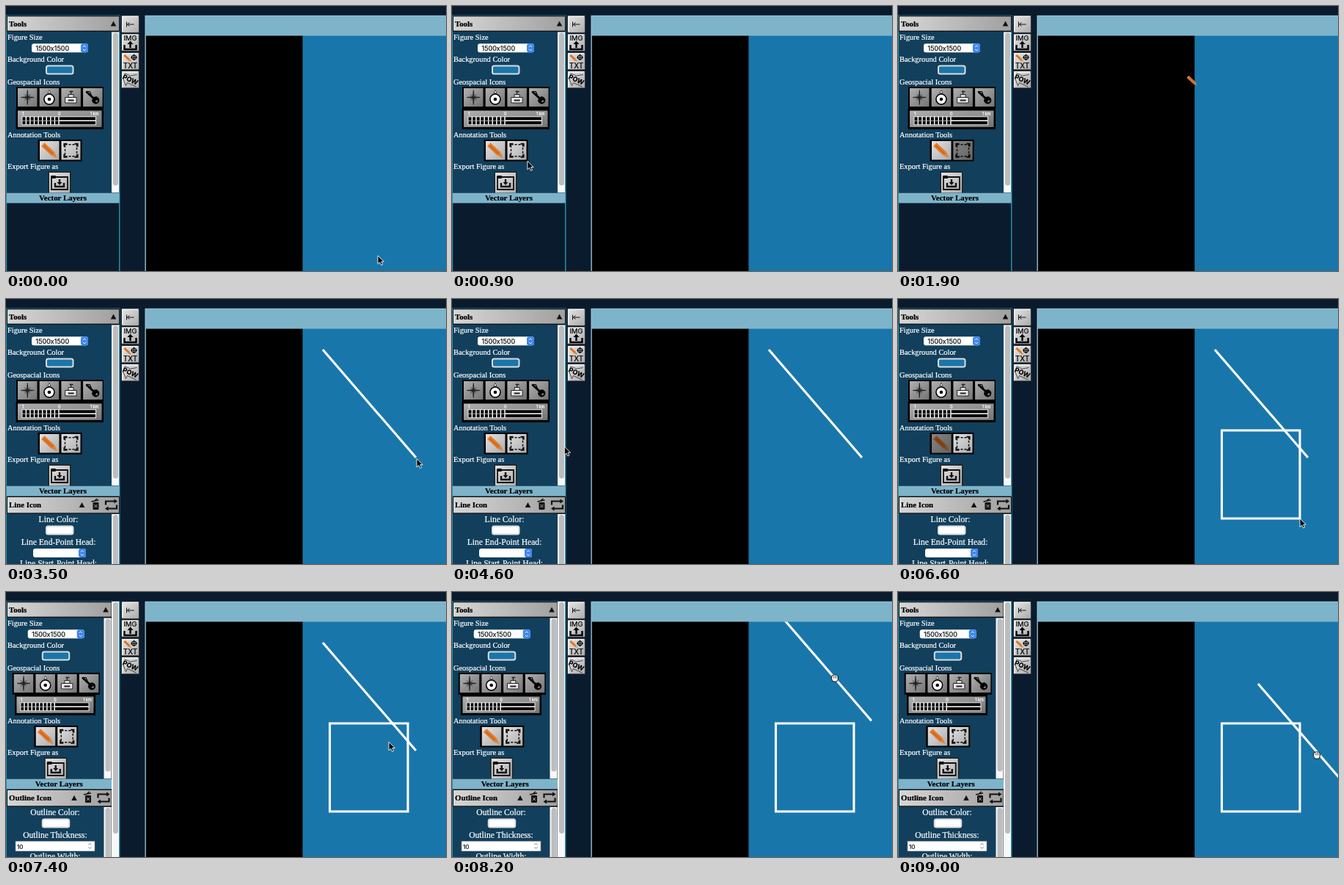
Recreate the animation shown at these times as an HTML page. Size 600 by 361 pixels, loop 9.1 s.

```html
<!DOCTYPE html>
<html>
<head>
<meta charset="utf-8">
<style>
html, body { margin: 0; width: 100%; height: 100%; overflow: hidden; background: #0a1b2e; }
svg { display: block; width: 600px; height: 361px; }
text { font-family: "Liberation Serif", "Times New Roman", serif; white-space: pre; stroke: currentColor; stroke-width: .22px; }
.sans { font-family: Inter, "Liberation Sans", sans-serif; }
.bold { font-weight: bold; }
.mid { text-anchor: middle; }
</style>
</head>
<body>
<svg id="stage" viewBox="0 0 600 361" xmlns="http://www.w3.org/2000/svg">
  <defs>
    <linearGradient id="head"><stop stop-color="#d6d6d6"/><stop offset="1" stop-color="#a0a0a0"/></linearGradient>
    <linearGradient id="light" x2="1" y2="1"><stop stop-color="#e2e2e2"/><stop offset="1" stop-color="#adadad"/></linearGradient>
    <linearGradient id="dark" x2="1" y2="1"><stop stop-color="#b0b0b0"/><stop offset="1" stop-color="#747474"/></linearGradient>
    <clipPath id="canvasClip"><rect x="191" y="40.5" width="409" height="321"/></clipPath>
    <clipPath id="toolsClip"><rect y="35" width="156" height="219.5"/></clipPath>
  </defs>
  <g id="page"></g>
  <g id="side"></g>
  <g clip-path="url(#canvasClip)" fill="none" stroke="#fff" stroke-width="3.1">
    <path id="line"/>
    <path id="box"/>
  </g>
  <g id="cursor"></g>
</svg>
<script>
const $ = id => document.getElementById(id);
const LOOP = 9100, STEP = 100;
const NAVY = '#0a1b2e', PANEL = '#123f5c', PALE = '#7eb4ca', TEAL = '#2f8ca2', BLUE = '#1976ab';

// Markup helpers
const rect = (x, y, w, h, fill, more = '') =>
  `<rect x="${x}" y="${y}" width="${w}" height="${h}" fill="${fill}" ${more}/>`;
const text = (x, y, size, str, cls = '', fill = '#fff') =>
  `<text x="${x}" y="${y}" font-size="${size}" class="${cls}" fill="${fill}" color="${fill}">${str}</text>`;
const path = (d, stroke = '#000', width = 1, fill = 'none', more = '') =>
  `<path d="${d}" stroke="${stroke}" stroke-width="${width}" fill="${fill}" ${more}/>`;
const dot = (x, y, r, fill, more = '') => `<circle cx="${x}" cy="${y}" r="${r}" fill="${fill}" ${more}/>`;
const at = (x, y, inner, more = '') => `<g transform="translate(${x} ${y})${more}">${inner}</g>`;

const pencil = path('M1 1.2L10 9.6', '#e57a28', 4) + path('M8.6 11.2L11.4 8L13.5 13Z', 'none', 0, '#d9853f') +
  path('M2 2.3L10 9.7', '#b85c1e', .7);
const button = (x, y, w, h, icon, shade, dim) =>
  rect(x, y, w, h, `url(#${shade})`) + at(x + w / 2, y + h / 2, icon) +
  (dim ? rect(x, y, w, h, '#000', 'opacity=".42"') : '');
const swatch = (x, y, fill) => rect(x + 1, y + 1, 36.5, 11, fill, 'rx="2.5" stroke="#dcdcdc" stroke-width="2"');
const chevrons = (x, y, color) => path(`M${x - 2} ${y - 1.5}l2-2l2 2M${x - 2} ${y + 1.5}l2 2l2-2`, color, 1);
const select = (x, y, w, str) =>
  rect(x, y, w, 12, '#fff', 'rx="3"') + rect(x + w - 10, y, 10, 12, '#3d86ee', 'rx="3"') +
  chevrons(x + w - 5, y + 6, '#fff') + text(x + 5.5, y + 9.2, 9, str, 'sans', '#111');
const scroll = (x, y, h, thumb) =>
  rect(x, y, 10, h, '#f8f8f8') + rect(x + 2, y + 1, 7, thumb, '#bdbdbd', 'rx="3.5"');
const header = (y, h, w, str) =>
  rect(1, y, w, h, '#101010') + rect(2, y + 1, w - 2, h - 2.2, 'url(#head)') +
  text(4, y + h / 2 + 3.6, 10.8, str, 'bold', '#000');
const arrowUp = (x, y) => path(`M${x - 3.8} ${y + 3.5}h7.6l-3.8-7z`, 'none', 0, '#111');

const compass = path('M0-10L1-1L9 0L1 1L0 10L-1 1L-9 0L-1-1Z', '#111', .6, '#333') +
  path('M-4-4L4 4M4-4L-4 4', '#111', .7);
const dial = dot(0, 2.5, 7, '#fff', 'stroke="#000" stroke-width="1.6"') + dot(0, 2.5, 2.3, '#000') +
  path('M-2-6L0-10L2-6Z', '#000', .6, '#fff');
const level = path('M-8 0H7.5V7.5H-8Z', '#222', 1, '#e8e8e8') + path('M-4 4H4', '#222', 2) +
  path('M-3.5 0V-4H3.5V0Z', '#222', 1, '#ddd') + path('M0-4V-9M-2-8H3', '#222', 1.3);
const key = path('M-9-8L3 3', '#000', 3) + path('M-9-8L-4-8L-2-3', '#000', 1.2) + dot(4, 4, 5, '#000') +
  dot(5, 5, 1.8, '#777') + path('M0 6L6 0', '#000', 4);
const marquee = path('M-8-8H8V8H-8Z', '#111', 1.5, 'none', 'stroke-dasharray="3 2"') +
  path('M-9-5V-9H-5M5-9H9V-5M9 5V9H5M-5 9H-9V5', '#111', 2.2);
const exportIcon = path('M-11-8H11V9H-11Z', '#111', 1.8) + rect(-12, -10, 7, 4, '#111', 'rx="1"') +
  path('M-6 0V5H6V0', '#111', 2.4) + path('M0-5V1', '#111', 2.4) + path('M-3.5-1H3.5L0 3Z', 'none', 0, '#111');

function scaleBar(narrow) {
  const [x0, x1, left, right] = narrow ? [12, 122, 20, 113] : [13.5, 133, 22, 122.5];
  const mid = (left + right) / 2;
  let s = rect(x0, 140, x1 - x0, 28, '#000') + rect(x0 + 2.5, 142.5, x1 - x0 - 5, 22.5, 'url(#dark)');
  s += text(left + 1, 149, 5.5, '1', 'sans mid') + text(mid + .5, 149, 5.5, '0', 'sans mid') +
    text(right - 2, 149, 5.5, '1 km', 'sans mid');
  s += rect(left, 150.8, right - left, 11, '#000', 'stroke="#eee"');
  for (let i = 1; i <= 9; i++) s += rect(left + (mid - left) * i / 9 - 1, 150.8, 1.5, 11, '#fff');
  return s + path(`M${left} 156.3H${mid}`, '#ccc', .8) + path(`M${mid} 156.3H${right}`, '#fff', 1.4);
}

function tools(w, dim) {
  const d = -w / 2;
  const icons = [compass, dial, level, key].map((ic, i) => button(16 + i * 29.7, 112, 26.5, 25, ic, 'dark')).join('');
  const pen = at(-10.5, -10, pencil, ' scale(1.55)');
  const label = (y, s) => text(2, y, 10.4, s);
  return rect(1, 35, 153 - w, 220, PANEL) +
    label(46, 'Figure Size') + label(75.5, 'Background Color') + label(106.5, 'Geospacial Icons') +
    label(178.7, 'Annotation Tools') + label(221.5, 'Export Figure as') +
    at(d, 0, select(35, 51.3, 77, '1500x1500') + swatch(54, 80.5, BLUE) +
      rect(14, 110, 119, 30, '#000') + icons +
      rect(43.5, 182, 60, 29.5, '#000') + button(46, 184, 26.5, 25.5, pen, 'light', dim === 'pen') +
      button(75.5, 184, 26, 25.5, marquee, 'light', dim === 'marquee') +
      rect(57.5, 225.5, 31, 31, '#222') + button(59, 227, 28, 28, exportIcon, 'light')) +
    scaleBar(w > 0) + scroll(144 - w, 35.5, 219, 208);
}

function layer(kind, w) {
  const d = -w / 2, line = kind === 'line', c = 71.5 + (line ? 0 : -4.5);
  const label = (y, s) => text(c, y, 11.6, s, 'mid');
  const name = line ? 'Line' : 'Outline';
  const trash = rect(-4, -4, 8, 10, '#111', 'rx="1"') + path('M-6-5L4-7M-1-7L2-9', '#111', 1.4) +
    path('M-2-1L2 3M2-1L-2 3', '#aaa', 1);
  const loop = path('M-7.5 0V-5H5M7.5 0V5H-5', '#111', 2.2) +
    path('M4-8L8.5-5L4-2ZM-4 2L-8.5 5L-4 8Z', 'none', 0, '#111');
  return rect(1, 292, 153 - w, 69, PANEL) + header(269, 23.5, 154 - w, name + ' Icon') +
    arrowUp(103.5 - w, 280.5) + at(122.5 - w, 281, trash) + at(143.5 - w, 280.5, loop) +
    label(303.7, name + ' Color:') + swatch(54 + d, 308.5, '#fff') +
    (line
      ? label(334.7, 'Line End-Point Head:') + select(37, 340, 72, '') + label(364.3, 'Line Start-Point Head:')
      : label(334.7, 'Outline Thickness:') + rect(13, 339.5, 108, 13.5, '#fff', 'stroke="#888" stroke-width=".6"') +
        text(15, 349.5, 8.2, '10', 'sans', '#111') + chevrons(114.5, 346, '#777') + label(364.3, 'Outline Width:')) +
    scroll(144 - w, 293, 68, 70);
}

function sidebar(kind, dim) {
  const w = kind === 'outline' ? 10.5 : 0;
  return rect(0, 12.5, 155.5, 349, TEAL) + rect(1.2, 13.5, 152.8, 348, NAVY) +
    header(13.3, 21.5, 154 - w, 'Tools') + arrowUp(146.5 - w, 24) +
    `<g clip-path="url(#toolsClip)">${tools(w, dim)}</g>` +
    rect(1, 254.7, 153.5 - w, 13.8, PALE) + text(77.5 - w / 2, 265.3, 10.9, 'Vector Layers', 'bold mid', '#000') +
    (kind ? layer(kind, w) : '') + (w ? scroll(144, 13, 348, 315) : '');
}

function page() {
  const strip = (y, inner) => rect(157.5, y, 24, 23.5, '#555') + rect(158, y + .5, 22.5, 22, '#f2f2f2') +
    rect(159.5, y + 2, 21, 20.5, 'url(#light)') + at(169.5, y + 12, inner);
  const tiny = (y, s, size, cls = '') => text(0, y, size, s, 'sans mid ' + cls, '#000');
  return rect(0, 0, 600, 361, NAVY) + rect(189.5, 12.8, 411, 349, '#a5cbd8') + rect(190.5, 13.5, 410, 27, PALE) +
    rect(190.8, 40.5, 214, 321, '#000') + rect(404.7, 40.5, 196, 321, BLUE) +
    strip(13, path('M-5-3.5V3.5M-4 0H5M-1-2.5L-4 0L-1 2.5', '#111', 1)) +
    strip(38, tiny(-2.7, 'IMG', 9.3) + path('M-8 3V9H8V3', '#000', 2.4) + path('M0 7V1', '#000', 2.4) +
      path('M-4 2H4L0-2.5Z', 'none', 0, '#000')) +
    strip(63.5, at(-9, -9.5, pencil, ' scale(.75)') + dot(5, -5.5, 3, 'none', 'stroke="#000" stroke-width="1.2"') +
      path('M5-10V-1.5M.5-5.5H9.5', '#000', 1) + tiny(9, 'TXT', 10)) +
    strip(88.5, `<g transform="rotate(24)">${tiny(3, 'POW', 9, 'bold')}</g>` +
      path('M-10-2L-6 8L-4 4L8 9.5M-8-9L0-5.5L9-7', '#111', .7));
}

const cursors = {
  arrow: path('M0 0V11.5L2.7 9L4.6 13L6.6 12.1L4.8 8.2H8.3Z', '#fff', .9, '#000'),
  pencil: at(-13, -12, pencil),
  cross: path('M-5.5 0H5.5M0-5.5V5.5', '#333', 3.2) + path('M-5 0H5M0-5V5', '#fff', 1.5),
  fist: path('M-4.5-1Q-4.5-4-2-3.5Q-1-5 1-4Q3-4.5 3.5-3Q5-2.5 4.5 0Q4.5 3 3 5H-2.5Q-5 2-4.5-1Z', '#111', 1, '#fff') +
    path('M-1.8-2.5V.5M.5-3V.5M2.7-2.5V.5', '#222', .8)
};

// Each track lists [time, x, y]
const pointer = [[0, 507, 340], [1000, 58, 197], [1300, 58, 197], [1900, 407, 107], [2100, 432, 69], [2200, 432, 69],
  [2900, 559, 216], [3100, 560, 217.5], [3500, 560, 217.5], [3700, 568, 214], [4000, 545, 225], [4700, 88, 197],
  [4900, 88, 197], [5500, 441, 179], [5600, 441, 179], [5800, 464, 212], [6000, 547, 280], [6300, 548, 299],
  [7000, 548, 299], [7600, 509, 157], [7800, 509, 157], [8200, 522, 117], [9000, 571, 222]];
const lineEnd = [[2200, 432, 69], [2900, 559, 216]];
const lineShift = [[7800, 0, 0], [8200, 13, -40.5], [9000, 59, 56]];
const boxEnd = [[5600, 441.5, 179], [5800, 461.5, 208], [6000, 547, 280], [6300, 548, 299]];

function along(track, t) {
  const i = track.findIndex(k => k[0] > t);
  if (i < 0) return track[track.length - 1].slice(1);
  if (!i) return track[0].slice(1);
  const [a, b] = [track[i - 1], track[i]], u = (t - a[0]) / (b[0] - a[0]);
  return [a[1] + (b[1] - a[1]) * u, a[2] + (b[2] - a[2]) * u];
}

// Value of the last entry that has started
const current = (list, t) => list.filter(e => e[0] <= t).pop()[1];
const cursorKinds = [[0, 'arrow'], [1300, 'pencil'], [3100, 'arrow'], [4900, 'cross'], [6400, 'arrow'], [7700, 'fist']];
const layerKinds = [[0, ''], [3100, 'line'], [6800, 'outline']];
const dimmed = [[0, ''], [1200, 'marquee'], [3100, ''], [4800, 'pen'], [6800, '']];

const shown = {};
function put(id, key, make) {
  if (shown[id] === key) return;
  shown[id] = key;
  $(id).innerHTML = make();
}

function draw(t) {
  const kind = current(layerKinds, t), dim = current(dimmed, t), shape = current(cursorKinds, t);
  put('side', kind + '/' + dim, () => sidebar(kind, dim));
  put('cursor', shape, () => cursors[shape]);
  $('cursor').setAttribute('transform', `translate(${along(pointer, t)})`);
  const [ex, ey] = along(lineEnd, t), [sx, sy] = along(lineShift, t), [bx, by] = along(boxEnd, t);
  $('line').setAttribute('d', t > 2200 ? `M${432 + sx} ${69 + sy}L${ex + sx} ${ey + sy}` : '');
  $('box').setAttribute('d', t > 5600 ? `M441.5 179H${bx}V${by}H441.5Z` : '');
}

$('page').innerHTML = page();
const start = performance.now();
function tick() {
  const t = (performance.now() - start) % LOOP;
  draw(Math.floor(t / STEP) * STEP);
  requestAnimationFrame(tick);
}
tick();
</script>
</body>
</html>
```
